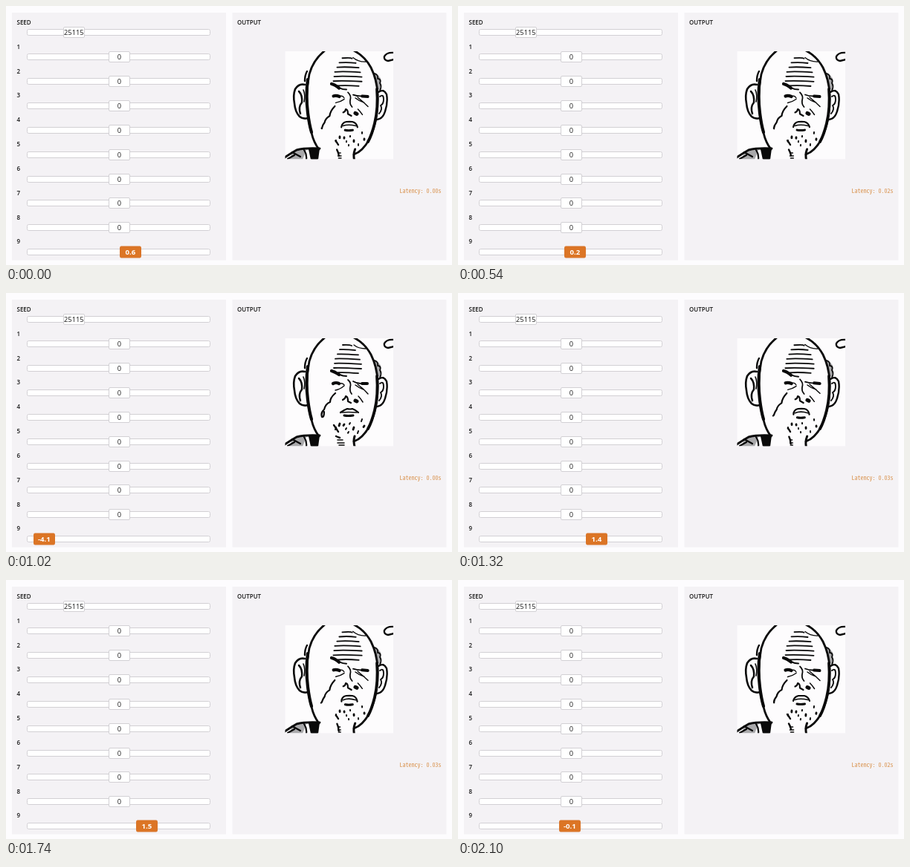
Write an HTML page that moves like this. It is 600 by 349 pixels and loops after 2160 ms.

```html
<!DOCTYPE html>
<html lang="en">
<head>
<meta charset="utf-8">
<title>Slider and portrait</title>
<style>
  html, body { margin: 0; width: 100%; height: 100%; overflow: hidden; background: #fdfcfe; }
  svg { display: block; width: 600px; height: 349px; }
  text { font-family: "Open Sans", "Noto Sans", sans-serif; fill: #1a1a1a; }
  .label { font-size: 8px; font-weight: 600; }
  .value { font-size: 9.3px; text-anchor: middle; }
  .track, .knob { fill: #fff; stroke: #d2d0d4; }
  .active .knob { fill: #dc7525; stroke: #d8742a; }
  .active .value { fill: #fff; font-size: 9.6px; font-weight: 700; }
  #latency { font: 8px "Noto Sans Mono CJK JP", "Noto Sans Mono", monospace; fill: #d88f48; text-anchor: end; }
  #face path { fill: none; stroke: #0a0a0a; stroke-linecap: round; stroke-linejoin: round; }
  #face path.solid { fill: #0a0a0a; }
  #face path.gray { fill: #a9a9ab; stroke: none; }
</style>
</head>
<body>
<svg viewBox="0 0 600 349">
  <defs><clipPath id="frame"><rect x="375.5" y="61" width="145.5" height="145.3"/></clipPath></defs>
  <rect x="8" y="9" width="288" height="333.5" fill="#f4f2f5"/>
  <rect x="304.5" y="9" width="288" height="333.5" fill="#f4f2f5"/>
  <text class="label" x="311" y="24.6">OUTPUT</text>
  <g id="sliders"></g>
  <g id="face" clip-path="url(#frame)">
    <rect x="375" y="61" width="147" height="146" fill="#fdfcfd"/>
  </g>
  <text id="latency" x="585.5" y="252"></text>
</svg>
<script>
const STEP = 60;
const values = [
  0.6, 1.5, 2.4, 3.2, 3.8, 4, 3.7, 2.7, 1.4, 0.2, -0.9, -1.9,
  -2.7, -3.3, -3.7, -3.9, -4, -4.1, -4.1, -2.9, -1.6, -0.1, 1.4, 2.6,
  3.4, 3.8, 3.8, 3.2, 2.4, 1.5, 0.3, -0.9, -1.9, -2.1, -1.2, -0.1
];
const latencies = "022322232223222320022232223223322322";

const byId = id => document.getElementById(id);
function add(parent, tag, attrs, text = "") {
  const el = document.createElementNS("http://www.w3.org/2000/svg", tag);
  for (const key in attrs) el.setAttribute(key, attrs[key]);
  el.textContent = text;
  parent.append(el);
  return el;
}

// Sliders, with edges on whole pixels
const ROW = 32.85, CENTER = 152, UNIT = 24.6;
function slider(row, label, x, text, height = 14) {
  const y = Math.floor(35.9 + row * ROW) + .5;
  const root = byId("sliders");
  add(root, "text", { class: "label", x: 14.5, y: 24.8 + row * ROW }, label);
  add(root, "rect", { class: "track", x: 28.5, y: y - 4, width: 246, height: 8, rx: 2 });
  const knob = add(root, "g", { transform: `translate(${x} ${y})` });
  add(knob, "rect", { class: "knob", x: -13.5, y: -height / 2, width: 28, height, rx: 1.5 });
  const value = add(knob, "text", { class: "value", x: .3, y: 3.6 }, text);
  return { knob, value, y };
}
slider(0, "SEED", 91, "25115");
for (let i = 1; i < 9; i++) slider(i, i, CENTER, "0");
const active = slider(9, "9", CENTER, "0", 15);
active.knob.setAttribute("class", "active");

// Portrait: fixed strokes
const face = byId("face");
const ink = (width, d, cls = "") => add(face, "path", { d, class: cls, "stroke-width": width });

// Collar
ink(0, "M384 200Q391 193 404 194L399 207H381Z", "gray");
ink(3, "M375 204Q384 198 391 194Q402 191 422 192");
ink(2.2, "M379 206L388 201M401 194Q405 200 404 207M385 197L396 203");
ink(2, "M408 193L421 192L419 207L411 207Z", "solid");
// Ears and hair
ink(2.6, "M402 106Q394 104 389 112Q386 120 388 131Q389 143 395 149Q400 153 406 151");
ink(2.5, "M394 115Q399 120 398 130Q393 136 396 145");
ink(1.6, "M400 113Q403 120 401 129");
ink(2.4, "M405 88Q402 93 402 101");
ink(0, "M495 90Q502 91 505 101L503 114L499 110Z", "gray");
ink(1.8, "M496 91Q501 93 500 98Q505 98 503 104Q506 108 503 114");
ink(2.4, "M501 116Q508 111 512 119Q514 130 510 142Q507 152 499 153");
ink(1.9, "M503 122Q508 118 508 126Q508 132 504 134Q507 139 502 145");
// Skull and jaw
ink(2.8, "M429 60Q413 73 408 92Q404 111 405 131Q406 154 411 171Q414 184 421 193");
ink(4.2, "M406 99Q403 120 406 144Q408 160 411 170");
ink(2.8, "M468 60Q483 68 491 83Q499 99 500 119Q501 143 495 163Q490 182 479 193Q474 198 468 200");
ink(3.8, "M499 112Q501 137 496 158Q492 174 487 183");
ink(2.4, "M522 63Q512 62 509 68Q508 73 514 74L522 72");

// Portrait: strokes that blend from a calm pose to a frowning one
const moving = [];
const blend = (width, low, high, cls) => moving.push({ el: ink(width, low, cls), low, high });

for (let i = 0; i < 7; i++) {
  const left = [453, 449, 446, 443, 442, 441, 447][i];
  const right = [465, 470, 474, 476, 478, 478, 474][i];
  const y = 70 + i * 6.2;
  blend(1.8,
    `M${left} ${y}Q${left + 9} ${y - .5} ${right} ${y + 1}`,
    `M${left - 1} ${y + .4}Q${left + 12} ${y - 1} ${right + 1} ${y + .6}`);
}
blend(1.3, "M468 70Q474 75 484 75", "M466 69Q474 76 484 75");
// Brows and eyes
blend(4.2, "M438 105Q442 106 448 110", "M438 105Q443 106 448 111");
blend(2, "M449 110Q453 112 458 112", "M449 111Q453 113 458 113");
blend(4.2, "M440 122Q444 120 448 122", "M441 121Q444 120 449 122");
blend(1.4, "M450 122Q453 121 455 124", "M450 121Q453 120 455 124");
blend(4, "M479 122L486 122", "M479 121L487 122");
blend(1.8, "M467 119Q472 122 477 122", "M467 120Q472 121 477 121");
blend(1.4, "M443 131Q449 130 455 125", "M444 130Q450 129 455 126");
blend(1.5, "M470 124Q475 128 481 130M473 123Q481 129 487 136", "M470 124Q475 128 482 130M473 123Q480 129 487 135");
// Nose
blend(1.8, "M460 117Q465 121 463 127Q462 132 465 136", "M460 116Q465 121 463 127Q462 132 466 136");
blend(2.2, "M453 144Q457 142 457 139Q460 139 460 146L464 148", "M454 143Q457 142 457 139Q460 139 460 145L465 148");
blend(5, "M470 145L472 146", "M470 144L472 145");
blend(1.5, "M474 139Q477 142 480 147", "M473 139Q476 142 479 146");
// Cheek crease
blend(2.2,
  "M443 135Q436 141 436 147Q430 149 428 157Q423 161 425 167Q428 168 428 160",
  "M442 135Q436 142 435 149Q430 152 429 157Q427 161 425 163Q423 164 422 168");
// Mouth
blend(2.2,
  "M450 161Q454 158 459 156Q463 157 466 156Q471 158 474 161",
  "M452 165Q450 157 457 156Q462 155 466 156Q472 157 472 165");
blend(1.6, "M452 161Q460 160 472 161", "M454 162Q461 158 470 162");
blend(3, "M455 165Q460 166 467 165", "M457 169Q461 170 466 169");
// Stubble
const stubble = [
  [449, 176], [463, 175], [479, 170], [482, 179], [444, 181],
  [458, 182], [468, 181], [461, 187], [474, 186], [455, 177]
];
stubble.forEach(([x, y], i) => {
  const reach = i % 2 ? 1.6 : 3;
  blend(i % 3 ? 2 : 2.8,
    `M${x} ${y}L${x - 1} ${y + reach}`,
    `M${x} ${y}L${x + .6} ${y + 1}`);
});
blend(2.4, "M441 178Q444 182 447 187", "M445 184Q446 185 447 187");
// Neck
blend(2.4, "M444 193Q446 194 449 195", "M446 194Q448 199 447 207");
blend(3, "M469 193Q467 199 469 207", "M470 193Q467 199 468 207");
blend(1.6, "M446 198L453 198M446 202L455 202M448 205L455 205", "M447 198L448 198M447 202L448 202M447 205L448 205");

function mix(low, high, u) {
  const ends = high.match(/-?[\d.]+/g);
  let i = 0;
  return low.replace(/-?[\d.]+/g, n => (+n + (ends[i++] - n) * u).toFixed(2));
}

function draw(index) {
  const v = values[index];
  active.knob.setAttribute("transform", `translate(${Math.round(CENTER + v * UNIT)} ${active.y})`);
  active.value.textContent = v;
  byId("latency").textContent = `Latency: 0.0${latencies[index]}s`;
  const u = (v + 4.1) / 8.1;
  for (const { el, low, high } of moving) el.setAttribute("d", mix(low, high, u));
}

const start = performance.now();
let shown = -1;
function tick() {
  const index = Math.floor((performance.now() - start) / STEP) % values.length;
  if (index !== shown) draw(shown = index);
  requestAnimationFrame(tick);
}
tick();
</script>
</body>
</html>
```
